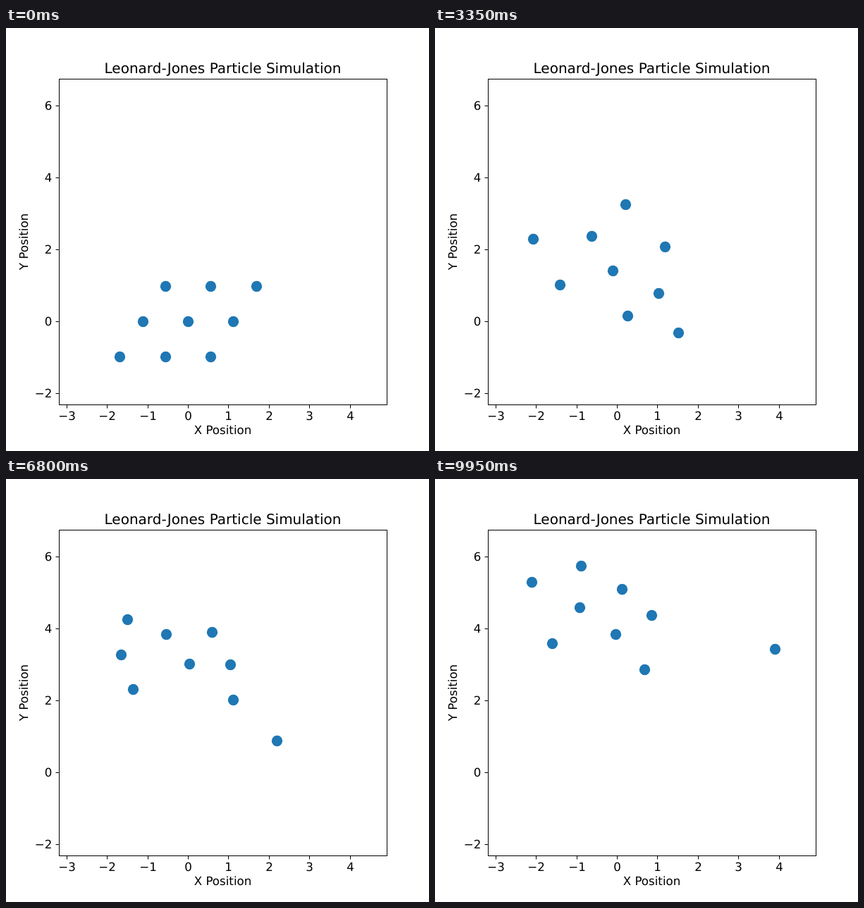
Animation of 600x600 px, one loop 10000 ms. Source, as an HTML page:

```html
<!DOCTYPE html>
<html lang="en">
<head>
<meta charset="utf-8">
<title>Particle simulation</title>
<style>
  html, body { margin: 0; width: 100%; height: 100%; overflow: hidden; background: #fff; }
  svg { display: block; font: 16.67px "DejaVu Sans", sans-serif; text-rendering: geometricPrecision; }
  .title { font-size: 20px; }
  .line { fill: none; stroke: #000; }
  circle { fill: #1f77b4; }
</style>
</head>
<body>
<svg id="plot" width="600" height="600" viewBox="0 0 600 600">
  <rect class="line" x="75.5" y="72.5" width="465" height="462"/>
  <text class="title" x="307.5" y="64" text-anchor="middle">Leonard-Jones Particle Simulation</text>
  <text x="307.5" y="576" text-anchor="middle">X Position</text>
  <text transform="translate(31 303) rotate(-90)" text-anchor="middle">Y Position</text>
</svg>
<script>
const plot = document.getElementById("plot");
const LOOP = 10000, STEP = 50;
const UNIT_X = 57.4, UNIT_Y = 51; // pixels per chart unit

function add(tag, attrs, text = "") {
  const node = document.createElementNS(plot.namespaceURI, tag);
  for (const key in attrs) node.setAttribute(key, attrs[key]);
  node.textContent = text;
  return plot.appendChild(node);
}

const label = n => String(n).replace("-", "\u2212");

for (let n = -3; n <= 4; n++) {
  const x = Math.floor(258.5 + UNIT_X * n) + 0.5;
  add("path", { class: "line", d: `M${x} 535v4.5` });
  add("text", { x, y: 556, "text-anchor": "middle" }, label(n));
}
for (let n = -2; n <= 6; n += 2) {
  const y = 416.5 - UNIT_Y * n;
  add("path", { class: "line", d: `M75 ${y}h-4.5` });
  add("text", { x: 65.3, y: y + 5.5, "text-anchor": "end" }, label(n));
}

// The particles start on a hexagonal lattice and pass a few key points
const TIMES = [0, 2150, 5300, 8200, 9950];
const ROUTES = [
  [215,316, 244,269, 264,245, 256,220],
  [267,348, 221,332, 151,257, 166,233],
  [281,284, 266,216, 204,229, 205,182],
  [153,333, 136,253, 203,168, 207,123],
  [314,408, 300,309, 327,227, 307,193],
  [327,350, 317,248, 272,194, 265,156],
  [171,405, 180,293, 150,198, 137,146],
  [249,406, 333,415, 432,315, 482,241],
  [344,465, 326,356, 316,280, 297,270]
];

const particles = ROUTES.map((route, i) => {
  const row = Math.floor(i / 3) - 1, col = i % 3 - 1;
  const points = [258 + 64.4 * (col - row / 2), 416 + 50 * row, ...route];
  return {
    xs: points.filter((_, k) => k % 2 === 0),
    ys: points.filter((_, k) => k % 2 === 1),
    dot: add("circle", { r: 7.7 })
  };
});

// Velocity at a key point, from the parabola through its neighbours
function slope(values, k) {
  const rate = j => (values[j + 1] - values[j]) / (TIMES[j + 1] - TIMES[j]);
  const last = TIMES.length - 1;
  if (k === 0) return rate(0);
  if (k === last) return rate(last - 1);
  const before = TIMES[k] - TIMES[k - 1], after = TIMES[k + 1] - TIMES[k];
  return (rate(k - 1) * after + rate(k) * before) / (before + after);
}

function glide(values, t) {
  let k = 0;
  while (k < TIMES.length - 2 && t >= TIMES[k + 1]) k++;
  const span = TIMES[k + 1] - TIMES[k], u = (t - TIMES[k]) / span, v = 1 - u;
  return v * v * (1 + 2 * u) * values[k] + u * u * (1 + 2 * v) * values[k + 1]
    + u * v * span * (v * slope(values, k) - u * slope(values, k + 1));
}

// Repulsion: push apart any pair closer than one chart unit
function separate(points) {
  for (let pass = 0; pass < 8; pass++) {
    points.forEach((a, i) => points.slice(i + 1).forEach(b => {
      const dx = b.x - a.x, dy = b.y - a.y;
      const gap = Math.hypot(dx / UNIT_X, dy / UNIT_Y);
      if (gap >= 1 || gap === 0) return;
      const push = (1 / gap - 1) / 2;
      a.x -= dx * push; a.y -= dy * push;
      b.x += dx * push; b.y += dy * push;
    }));
  }
}

function draw(now) {
  const t = Math.floor(now % LOOP / STEP) * STEP;
  const points = particles.map(({ xs, ys }) => ({ x: glide(xs, t), y: glide(ys, t) }));
  separate(points);
  // Markers snap to pixel centres
  points.forEach(({ x, y }, i) => {
    particles[i].dot.setAttribute("cx", Math.round(x) + 0.5);
    particles[i].dot.setAttribute("cy", Math.round(y) + 0.5);
  });
}

const began = performance.now();
function tick() {
  draw(performance.now() - began);
  requestAnimationFrame(tick);
}
tick();
</script>
</body>
</html>
```
